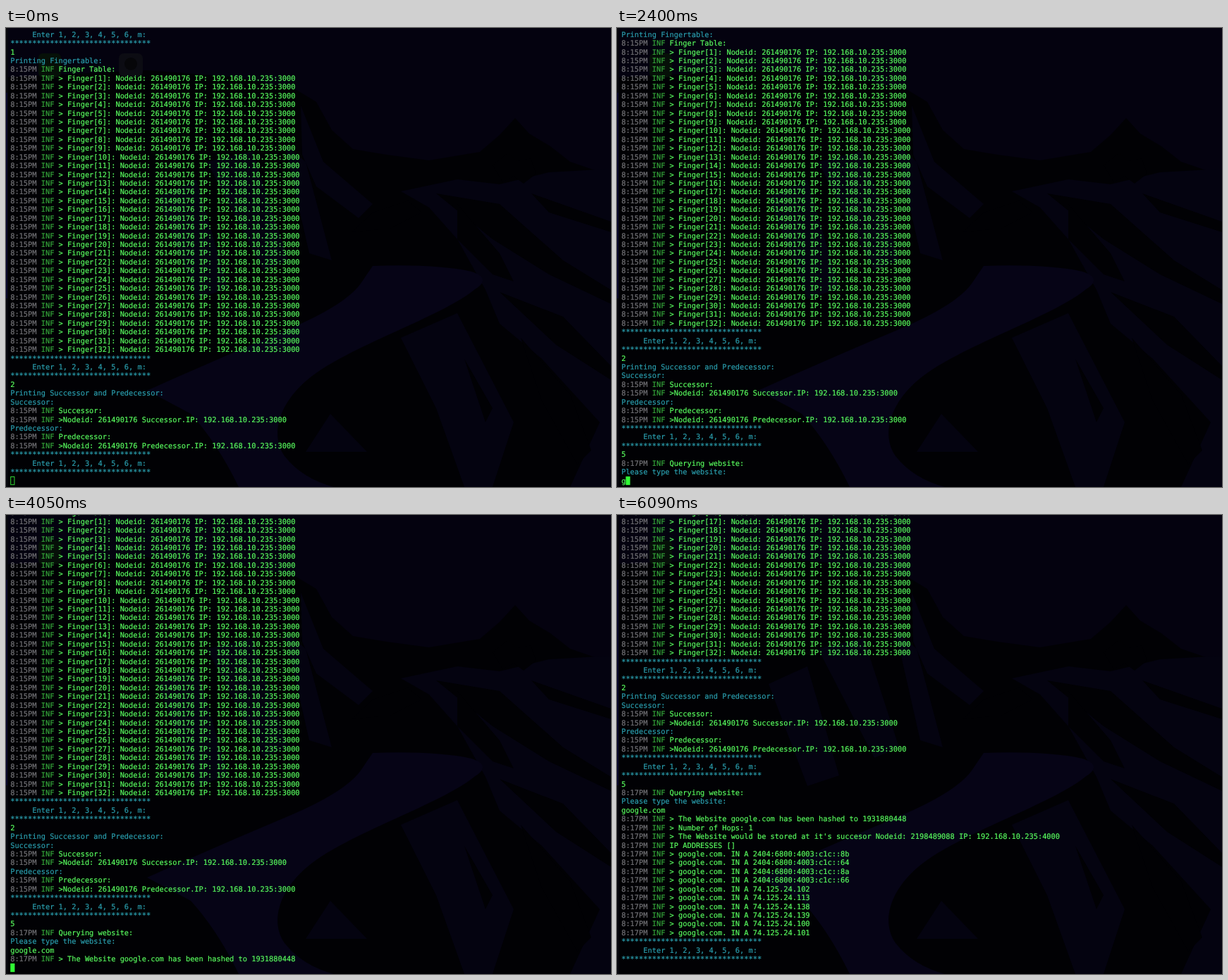
These frames come from a looping animation (858 px wide and 652 px high, 6180 ms). An HTML page:

```html
<!DOCTYPE html>
<html lang="en">
<head>
<meta charset="utf-8">
<title>Terminal session</title>
<style>
  html, body { margin: 0; width: 100%; height: 100%; overflow: hidden; background: #010104; }
  svg { display: block; width: 858px; height: 652px; }
  text {
    font: 10.33px "DejaVu Sans Mono", "Liberation Mono", monospace;
    text-rendering: geometricPrecision;
    white-space: pre;
    stroke-width: .2px;
  }
  .fg { fill: #58fb5e; stroke: #58fb5e; }
  .say { fill: #2a9dac; stroke: #2a9dac; }
  .time { fill: #727275; stroke: #727275; }
  .level { fill: #35a53a; stroke: #35a53a; }
  .sky { fill: #04020f; }
  .road { fill: #060416; }
  .rock { fill: #040310; }
  .dark { fill: #010104; }
</style>
</head>
<body>
<svg viewBox="0 0 858 652" aria-label="Terminal">
  <rect class="dark" width="858" height="652"/>
  <path class="sky" d="M0 0H858V210L800 190 772 168 742 150 722 128 700 152 672 176 600 188 540 180 492 172 462 145 440 105 412 88 330 70 200 60 0 70Z"/>
  <g class="rock">
    <path d="M858 200V652H800L842 560 760 470 700 420 680 372 640 300 600 255 560 232 640 215 700 222 770 205Z"/>
    <path d="M418 110L450 190 520 250 500 270 440 225 420 180Z"/>
    <path d="M285 190L350 175 400 330 365 345Z M395 165L425 190 462 330 430 320Z M215 240L270 215 315 370 270 385Z"/>
    <path d="M560 440L640 405 720 560 690 652H650L610 540Z"/>
    <path d="M425 602L460 548 512 602Z"/>
  </g>
  <g class="dark">
    <path d="M520 262L570 245 590 262 545 285 490 290Z M690 195l22-18 12 12 20-4 8 22-18 14-14-10-16 8z"/>
    <path d="M610 235L700 250 790 330 858 372V392L770 350 690 300Z M700 375L790 410 858 480V500L780 450Z"/>
    <path d="M640 250L700 320 720 360 690 350 640 300Z M730 440L800 520 830 600 810 620 760 530Z M650 470L690 540 680 560Z"/>
    <path d="M745 235L858 275V290L770 262Z"/>
  </g>
  <path class="road" d="M520 338Q610 335 660 346 690 356 664 372C620 408 500 448 440 490 390 525 372 575 395 608Q420 640 465 652H330Q300 590 262 548L200 515Q300 470 400 428 485 392 505 360Z"/>
  <rect x="46" y="36" width="32" height="34" rx="6" fill="#061008"/>
  <g id="icon">
    <rect x="160" y="36" width="34" height="33" rx="7" fill="#0c0c13"/>
    <circle cx="177" cy="51" r="9" fill="#060609"/>
  </g>
  <rect width="3" height="652" fill="#07070d"/>
  <rect y="92" width="2" height="292" fill="#08062a"/>
  <g id="rows"></g>
  <rect id="cursor" width="6.2" height="12.2"/>
</svg>
<script>
const LOOP = 6180, LAST = 51, LEFT = 6.2, CHAR = 6.22, PITCH = 12.43, BASE = 12.7;

const input = s => [["fg", s]];
const say = s => [["say", s]];
const log = (time, s) => [["time", time + " "], ["level", "INF "], ["fg", s]];
const early = s => log("8:15PM", s);
const late = s => log("8:17PM", s);
const stars = say("*".repeat(32));
const menu = [stars, say("     Enter 1, 2, 3, 4, 5, 6, m:"), stars];
const node = "261490176", ip = "192.168.10.235";
const record = a => late("> google.com. IN A " + a);

const lines = [
  ...menu.slice(1),
  input("1"),
  say("Printing Fingertable:"),
  early("Finger Table:"),
  ...Array.from({ length: 32 }, (_, i) => early(`> Finger[${i + 1}]: Nodeid: ${node} IP: ${ip}:3000`)),
  ...menu,
  input("2"),
  say("Printing Successor and Predecessor:"),
  ...["Successor", "Predecessor"].flatMap(s => [
    say(s + ":"), early(s + ":"), early(`>Nodeid: ${node} ${s}.IP: ${ip}:3000`)
  ]),
  ...menu,
  input("5"),
  late("Querying website:"),
  say("Please type the website:"),
  input("google.com"),
  late("> The Website google.com has been hashed to 1931880448"),
  late("> Number of Hops: 1"),
  late(`> The Website would be stored at it's succesor Nodeid: 2198489088 IP: ${ip}:4000`),
  late("IP ADDRESSES []"),
  ...["8b", "64", "8a", "66"].map(s => record("2404:6800:4003:c1c::" + s)),
  ...[102, 113, 138, 139, 100, 101].map(n => record("74.125.24." + n)),
  ...menu
];

// start time, printed lines, typed text, cursor style
const keys = [2400, 2490, 2640, 2820, 2940, 3120, 3270, 3390, 3510, 3630];
const steps = [
  [0, 51, "", "hollow"],
  [600, 51, "", "solid"],
  [1080, 51, "", "off"],
  [1320, 51, "5", "solid"],
  [1770, 54, "", "solid"],
  ...keys.map((t, i) => [t, 54, "google.com".slice(0, i + 1), "solid"]),
  [3900, 56, "", "solid"],
  [4080, 72, "", "solid"],
  [5100, 72, "", "off"],
  [5550, 72, "", "solid"],
  [6060, 72, "", "off"]
];

const make = (tag, attrs, parent) => {
  const el = document.createElementNS("http://www.w3.org/2000/svg", tag);
  for (const k in attrs) el.setAttribute(k, attrs[k]);
  return parent.appendChild(el);
};
const byId = id => document.getElementById(id);
const cursor = byId("cursor");

// one extra row above the stage keeps its descenders visible
const rows = Array.from({ length: LAST + 2 }, (_, i) =>
  make("text", { x: LEFT, y: (BASE + (i - 1) * PITCH).toFixed(2) }, byId("rows")));

function draw([, count, typed, style]) {
  const top = count - LAST;
  rows.forEach((row, i) => {
    const n = top + i - 1;
    row.textContent = "";
    const parts = n === count ? input(typed) : lines[n] || [];
    for (const [cls, s] of parts) make("tspan", { class: cls }, row).textContent = s;
  });
  const hollow = style === "hollow", inset = hollow ? .5 : 0;
  cursor.setAttribute("x", LEFT + typed.length * CHAR + inset);
  cursor.setAttribute("y", 637 + inset);
  cursor.setAttribute("width", 6.2 - 2 * inset);
  cursor.setAttribute("height", 12.2 - 2 * inset);
  cursor.setAttribute("fill", hollow ? "none" : "#30fb34");
  cursor.setAttribute("stroke", hollow ? "#30d834" : "none");
  cursor.setAttribute("visibility", style === "off" ? "hidden" : "visible");
  byId("icon").setAttribute("visibility", count === 51 ? "visible" : "hidden");
}

let shown;
function tick() {
  const t = performance.now() % LOOP;
  const step = steps.findLast(s => s[0] <= t);
  if (step !== shown) draw(shown = step);
  requestAnimationFrame(tick);
}
tick();
</script>
</body>
</html>
```
